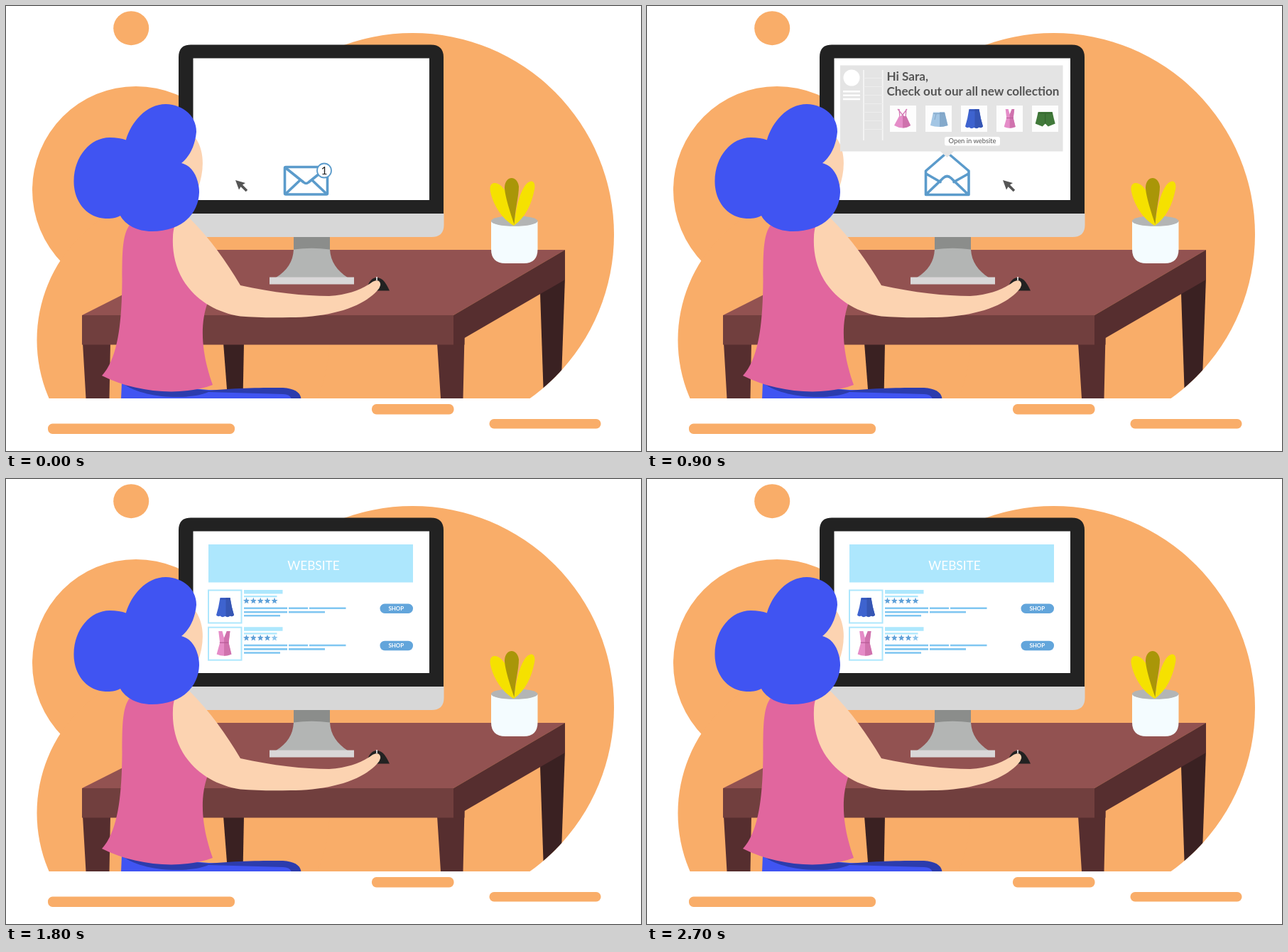
An HTML page for the animation above (3 s loop, 894 by 626 pixels).

```html
<!DOCTYPE html>
<html lang="en">
<head>
<meta charset="utf-8">
<title>Shopping from an email</title>
<style>
html, body { margin: 0; width: 100%; height: 100%; overflow: hidden; background: #fff; }
svg { display: block; width: 100%; height: 100%; }
text { font-family: Lato, "Open Sans", sans-serif; }
.line { fill: none; stroke: #5b9bcb; stroke-width: 3.6; stroke-linejoin: round; stroke-linecap: round; }

.mail, .open, .home, .list, .rays, .cursor { animation: 3s step-end infinite; }
.mail { animation-name: mail; }
.open { animation-name: open; }
.home { animation-name: home; }
.list { animation-name: list; }
.rays { animation-name: rays; }
.cursor { animation-name: cursor; }

@keyframes mail { 0% { visibility: visible } 30%, 100% { visibility: hidden } }
@keyframes open { 0%, 60%, 100% { visibility: hidden } 30% { visibility: visible } }
@keyframes home { 0%, 70% { visibility: hidden } 60%, 90%, 100% { visibility: visible } }
@keyframes list { 0%, 90%, 100% { visibility: hidden } 70% { visibility: visible } }
@keyframes rays { 0%, 30%, 60%, 100% { visibility: hidden } 20%, 50% { visibility: visible } }
@keyframes cursor {
  0% { transform: translate(323px, 245px); visibility: visible }
  10% { transform: translate(421px, 244px); visibility: visible }
  30% { transform: translate(501px, 245px); visibility: visible }
  40% { transform: translate(460px, 186px); visibility: visible }
  60%, 100% { transform: translate(460px, 186px); visibility: hidden }
}
</style>
</head>
<body>
<svg viewBox="0 0 894 626" preserveAspectRatio="none">
  <defs>
    <clipPath id="floor"><rect width="894" height="552"/></clipPath>
    <clipPath id="disc"><circle cx="572.5" cy="321.5" r="283.5"/></clipPath>

    <g id="pinafore">
      <path d="M-7-14L3-2M6-14L-3-2M-5-14L-4-2M5-14L4-2" fill="none" stroke="#d47ab5" stroke-width="1.3"/>
      <path d="M-5-4H5L11 9Q0 16-12 9z" fill="#e58cc8"/>
      <path d="M0-4H5L11 9Q6 12.500 0 12.500z" fill="#cf72ad"/>
    </g>
    <g id="short">
      <path d="M-8-9.500H8L12.500 9Q0 13-12 9z" fill="#a3c6e4"/>
      <path d="M1-9.500H8L12.500 9Q7 11 1 11z" fill="#84a9cb"/>
      <path d="M-8-7.500H8M-4-7L-6 1" fill="none" stroke="#7b9fc0" stroke-width=".8"/>
    </g>
    <g id="skirt">
      <path d="M-7-13.500H7Q9 0 12.500 11Q10 14 7 12Q4 15 0 12.500Q-4 15-7 12Q-10 14-12.500 11Q-9 0-7-13.500z" fill="#3e63cf"/>
      <path d="M1-13.500H7Q9 0 12.500 11Q10 14 7 12Q4 14 1 12.500z" fill="#3656b4"/>
      <path d="M-7-11.500H7" stroke="#304da4"/>
    </g>
    <g id="dress">
      <path d="M-6-13.500H-2L0-6L3-13.500H6.500L5-1L8 11.500Q0 15-8 11.500L-4.500-1z" fill="#e58cc8"/>
      <path d="M0-6L3-13.500H6.500L5-1L8 11.500Q4 13.300 0 13.300z" fill="#cf72ad"/>
      <path d="M-4.800-1H5" stroke="#b95c98"/>
    </g>
    <g id="shorts">
      <path d="M-10-9.500H10Q12 0 14 7L4 11L0 7L-4 11L-14 7Q-12 0-10-9.500z" fill="#41793a"/>
      <path d="M-10-7.500H10M0-7V7" fill="none" stroke="#34632f"/>
    </g>

    <path id="star" d="M0-4.700L1.300-1.600L4.500-1.450L2 .65L2.800 3.800L0 2L-2.800 3.800L-2 .65L-4.500-1.450L-1.300-1.600z"/>
    <g id="item">
      <rect x="285" y="156.500" width="46.500" height="46" fill="#fff" stroke="#ade7fd" stroke-width="2"/>
      <path d="M335 156h54.500v5.500H335zM335 164h46.500v2.200H335z" fill="#ade7fd"/>
      <g fill="#5fa0d8">
        <use href="#star" x="338.500" y="171.500"/><use href="#star" x="348.300" y="171.500"/>
        <use href="#star" x="358.200" y="171.500"/><use href="#star" x="368" y="171.500"/>
      </g>
      <use href="#star" x="378" y="171.500" fill="currentColor"/>
      <path d="M335 181.800H396M398 181.800H425M427 181.800H478.500M335 187.200H396M398 187.200H449M335 192.300H386" stroke="#7fc6f1" stroke-width="2.600"/>
      <rect x="526.500" y="175.500" width="46.500" height="13.500" rx="6.500" fill="#62a5db"/>
      <text x="549.300" y="185.200" font-size="7.900" font-weight="700" text-anchor="middle" fill="#fff">SHOP</text>
    </g>
  </defs>

  <!-- backdrop -->
  <g fill="#f9ad69">
    <g clip-path="url(#floor)">
      <circle cx="572.500" cy="321.500" r="283.500"/>
      <circle cx="183" cy="259" r="146"/>
      <circle cx="249.500" cy="470" r="206"/>
    </g>
    <ellipse cx="176.200" cy="31.200" rx="25" ry="24"/>
    <rect x="59" y="587.500" width="263" height="14.500" rx="6.500"/>
    <rect x="515" y="560" width="115.500" height="14.500" rx="6.500"/>
    <rect x="680.500" y="581" width="157" height="13.500" rx="6.500"/>
  </g>

  <!-- desk -->
  <path d="M752 404L787 383L781 552H757z" fill="#3a2122" clip-path="url(#disc)"/>
  <path d="M306 474H335L333.500 552H312z" fill="#3a2122"/>
  <path d="M108 474H147L145.500 552H112.500zM607 474L645.500 464L643.500 552H612z" fill="#562e2f"/>
  <path d="M107 435L290 343H787L630 435z" fill="#925251"/>
  <path d="M107 435H630V476.500H107z" fill="#713f3e"/>
  <path d="M630 435L787 343V385L645.500 467V476.500H630z" fill="#562e2f"/>

  <!-- monitor -->
  <path d="M405 324H456V345H405z" fill="#8b8d8b"/>
  <path d="M405 342.500Q430 339 456 342.500C457 360 466 372 481 382H380C396 372 404 360 405 342.500z" fill="#b3b5b4"/>
  <rect x="371" y="381.500" width="119" height="10" fill="#d9d7d8"/>
  <path d="M243 292V72Q243 54.500 260 54.500H598Q616 54.500 616 72V292z" fill="#222"/>
  <path d="M243 292H616.500V308Q616.500 325 599 325H260Q243 325 243 308z" fill="#d7d7d7"/>
  <rect x="263.500" y="73.500" width="332.500" height="199.500" fill="#fff"/>

  <!-- plant -->
  <path d="M683 303H748.500V342Q748.500 362 729 362H703Q683 362 683 342z" fill="#f4fcff"/>
  <ellipse cx="715.700" cy="302.500" rx="32.800" ry="7.300" fill="#b3b5b5"/>
  <path d="M715 309C698 300 684 277 681.500 258C681 247 690 247 697 253C709 264 716 287 715 309z" fill="#f5e100"/>
  <path d="M715 309C718 283 724 258 734 249C741 243 746 248 744 258C740 279 731 298 715 309z" fill="#f5e100"/>
  <path d="M715.500 307C708 285 702 265 702 255C703 238 720 238 722 254C722 267 717 285 715.500 307z" fill="#a99608"/>

  <!-- woman -->
  <g clip-path="url(#floor)">
    <path d="M162 553L163 529L285 540L388 544Q400 545 403 553z" fill="#4054f2"/>
    <path d="M163 529L286 541C325 537 365 537 390 537C405 538 415 543 415.500 553H402Q400 546 390 546L285 543C260 554 195 554 163 530z" fill="#2c3cad"/>
  </g>
  <path d="M175 307C164 320 163.500 345 163.500 385C163 450 157 496 135 520C180 543 245 550 291 533C279 500 270 455 284 417L255 298z" fill="#e1669e"/>
  <path d="M508 397C511 387 516 382 522 382C531 382 536 392 540 400.500H512z" fill="#222"/>
  <path d="M522 381V386" stroke="#fff" stroke-width="1.500"/>
  <path d="M235 325C236 301 246 294 259 299C287 327 310 359 330 393C375 403 420 408 455 408C484 406 502 398 516 388C523 384 528 387 527 393Q526 397 523 400C500 426 450 438 400 438Q362 439 330 436.500C295 431 266 413 249 385C238 366 234 345 235 325z" fill="#fcd3b1"/>
  <path d="M245 188L267 186C281 206 279 237 268 262L240 245z" fill="#fcd3b1"/>
  <path d="M169 188C176 164 197 138 225 138C250 139 268 155 268 177C266 199 257 213 247 221C264 225 272 245 272 262C271 293 247 317 205 317C185 317 168 308 161 295C154 299 147 299 140 299C113 298 95 274 95.500 246C96 211 119 185 146 185Q160 185 169 188.500z" fill="#4054f2"/>

  <!-- unread mail -->
  <g class="mail">
    <rect class="line" x="392.500" y="226.500" width="60" height="38.500" rx="1.500"/>
    <path class="line" d="M394 228L419 248Q422.500 251 426 248L451 228M394 264L413 246M451 264L432 246"/>
    <circle cx="448" cy="231.500" r="10" fill="#fff" stroke="#5b9bcb" stroke-width="1.800"/>
    <text x="448" y="237" font-size="15.500" text-anchor="middle" fill="#222">1</text>
  </g>

  <!-- opened mail -->
  <g class="open">
    <path class="line" d="M392.500 232L422.500 206L453 232V265.500H392.500zM393 236L413 247.500M452.500 236L432 247.500M394 264L417 242Q422.500 237 428 242L451 264"/>
    <path d="M272 83.500H585.500V204.500H432L422.500 213L413 204.500H272z" fill="#e4e4e4"/>
    <circle cx="288" cy="101" r="11.500" fill="#fff"/>
    <path d="M276 120.200H300M276 125.600H300M276 131H300" stroke="#fff" stroke-width="2.400"/>
    <path d="M305 90V189M331.700 90V189" stroke="#f6f6f6" stroke-width="1.800"/>
    <path d="M305 101.500h27m-27 12h27m-27 12h27m-27 12h27m-27 12h27m-27 12h27m-27 12h27" stroke="#ededed" fill="none"/>
    <g font-size="17.100" font-weight="700" fill="#555">
      <text x="337.500" y="105">Hi Sara,</text>
      <text x="337.500" y="126">Check out our all new collection</text>
    </g>
    <path d="M342 140h37v37h-37zm50 0h37v37h-37zm50 0h37v37h-37zm50 0h37v37h-37zm50 0h37v37h-37z" fill="#fdfdfd"/>
    <use href="#pinafore" x="360" y="159"/>
    <use href="#short" x="411" y="159"/>
    <use href="#skirt" x="460.500" y="158.500"/>
    <use href="#dress" x="510.700" y="158.500"/>
    <use href="#shorts" x="560.700" y="158.500"/>
    <rect x="419" y="184" width="78" height="12.500" rx="3" fill="#fff"/>
    <text x="458" y="193.300" font-size="9.400" text-anchor="middle" fill="#555">Open in website</text>
  </g>

  <!-- shop, top of page -->
  <g class="home">
    <rect x="285" y="92" width="288" height="53.500" fill="#ade7fd"/>
    <text x="433" y="127.700" font-size="17.300" text-anchor="middle" fill="#fff">WEBSITE</text>
    <use href="#item" color="#5fa0d8"/>
    <use href="#item" y="52.200" color="#8ec5ec"/>
    <use href="#skirt" x="308.500" y="180.500"/>
    <use href="#dress" transform="translate(307 231.500) scale(1.300)"/>
  </g>

  <!-- shop, scrolled -->
  <g class="list">
    <use href="#item" y="-60.700" color="#5fa0d8"/>
    <use href="#item" y="-8.500" color="#8ec5ec"/>
    <use href="#item" y="43.700" color="#5fa0d8"/>
    <use href="#skirt" x="308.500" y="120"/>
    <use href="#dress" transform="translate(307 171) scale(1.300)"/>
    <use href="#short" transform="translate(308 222) scale(1.220 1.300)"/>
  </g>

  <g class="cursor">
    <path d="M0 0L14 4L10 6.500L17.200 13.700L14.700 16.300L7.500 9.200L5 13.500z" fill="#555" stroke="#fff" stroke-opacity=".5" stroke-width="1.200" paint-order="stroke"/>
    <path class="rays" d="M-15.500 2.500L-4 4M-10-10L-4-3M4.500-12L3.500-3" transform="scale(.92)" fill="none" stroke="#444" stroke-width="1.900"/>
  </g>
</svg>
</body>
</html>
```
